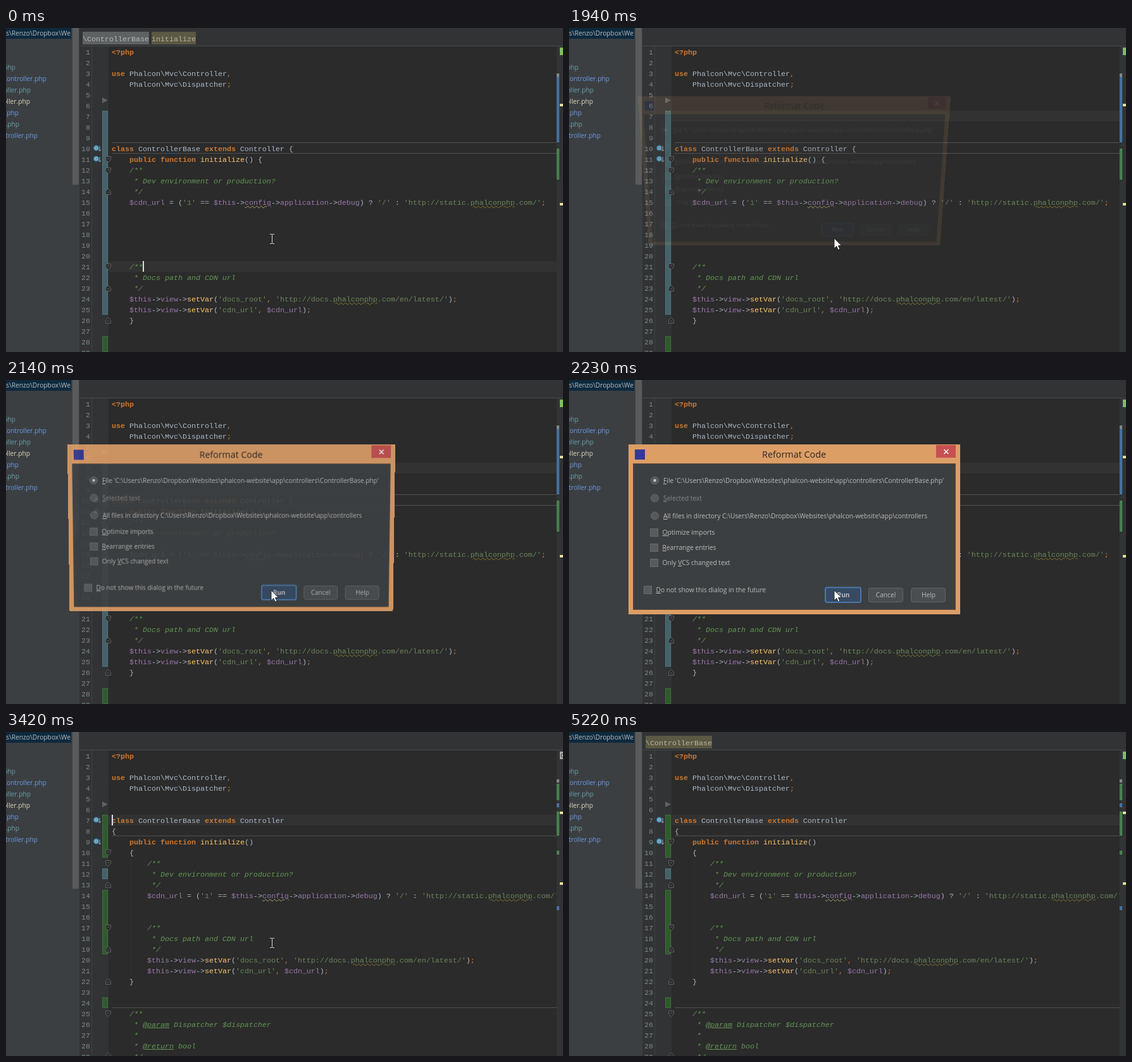
These frames come from a looping animation (880x513 px, 5640 ms). An HTML page:

```html
<!DOCTYPE html>
<html lang="en">
<head>
<meta charset="utf-8">
<title>Reformat Code</title>
<style>
  html, body { margin: 0; width: 100%; height: 100%; overflow: hidden; background: #2b2b2b; }
  #stage { position: relative; width: 880px; height: 513px; overflow: hidden; background: #2b2b2b; }
  #stage > *, .view > * { position: absolute; }
  .full, .view { left: 0; top: 0; width: 880px; height: 513px; }
  svg { display: block; }
  svg text { font: 10.24px "Open Sans", sans-serif; }
  pre, .crumbs span { margin: 0; font: 11.667px/17px "Liberation Mono", monospace; white-space: pre; }
  .code { left: 167px; top: 31px; width: 703px; height: 482px; overflow: hidden; color: #a9b7c6; }
  #nums { left: 113px; top: 31px; width: 20px; text-align: right; color: #7b898b; }
  .key { color: #cc7832; font-weight: bold; }
  .punct { color: #cc7832; }
  .str { color: #6a8759; }
  .var { color: #9876aa; }
  .fn { color: #ffc66d; }
  .doc { color: #629755; font-style: italic; }
  .typo, .warn { text-decoration: underline wavy #857a30 1px; text-underline-offset: 1px; }
  .warn { text-decoration-color: #aaa370; }
  .crumbs { left: 121px; top: 6px; display: flex; gap: 4px; }
  .crumbs span { height: 20px; line-height: 24px; color: #b4b8b8; background: #5f6263; }
  .crumbs .here { color: #b9b69c; background: #5b5843; }
  #row { left: 162px; top: 29px; width: 708px; height: 17px; background: #323232; }
  #caret { left: 167px; top: 29px; width: 2px; height: 17px; background: #dcdcdc; }
  #dialog { left: 94px; top: 102px; width: 524px; height: 269px; }
  #dialog .btn text { text-anchor: middle; }
</style>
</head>
<body>
<div id="stage">
  <svg class="full" viewBox="0 0 880 513">
    <rect width="116" height="513" fill="#3c3f41"/>
    <rect width="103" height="17" fill="#0d293e"/>
    <text y="12" fill="#b8bec2">s\Renzo\Dropbox\We</text>
    <g id="tree" text-anchor="end"></g>
    <rect x="105" width="10" height="248" fill="#595b5c"/>
    <rect x="116" width="764" height="28" fill="#313335"/>
    <rect x="116" y="28" width="46" height="485" fill="#313335"/>
    <rect x="870" y="28" width="10" height="485" fill="#313335"/>
    <path d="M116 28.500H880" stroke="#46494b"/>
    <path d="M135.500 29V513" stroke="#4a4d4e" stroke-dasharray="1 1"/>
  </svg>
  <div id="row"></div>
  <pre id="nums"></pre>

  <div id="before" class="view">
    <svg class="full" viewBox="0 0 880 513"></svg>
    <pre class="code">&lt;?php

use Phalcon\Mvc\Controller,
    Phalcon\Mvc\Dispatcher;





class ControllerBase extends Controller {
    public function initialize() {
    /**
     * Dev environment or production?
     */
    $cdn_url = ('1' == $this->config->application->debug) ? '/' : 'http://static.phalconphp.com/';





    /**
     * Docs path and CDN url
     */
    $this->view->setVar('docs_root', 'http://docs.phalconphp.com/en/latest/');
    $this->view->setVar('cdn_url', $cdn_url);
    }</pre>
  </div>

  <div id="after" class="view">
    <svg class="full" viewBox="0 0 880 513"></svg>
    <pre class="code">&lt;?php

use Phalcon\Mvc\Controller,
    Phalcon\Mvc\Dispatcher;


class ControllerBase extends Controller
{
    public function initialize()
    {
        /**
         * Dev environment or production?
         */
        $cdn_url = ('1' == $this->config->application->debug) ? '/' : 'http://static.phalconphp.com/';


        /**
         * Docs path and CDN url
         */
        $this->view->setVar('docs_root', 'http://docs.phalconphp.com/en/latest/');
        $this->view->setVar('cdn_url', $cdn_url);
    }


    /**
     * @param Dispatcher $dispatcher
     *
     * @return bool
     */</pre>
  </div>

  <svg class="full" viewBox="0 0 880 513">
    <path d="M152 110L161 114.500L152 119Z" fill="#606365"/>
    <rect id="status" x="875" y="31" width="5" height="12" fill="#7fbf5f"/>
    <g id="busy"><rect x="875" y="31" width="5" height="12" fill="#a8a8a8"/><path d="M880 34a3 3 0 0 0 0 6" fill="none" stroke="#444"/></g>
    <g id="fold1"></g>
  </svg>
  <div id="crumbs1" class="crumbs"><span>\ControllerBase</span><span class="here">initialize</span></div>
  <div id="crumbs2" class="crumbs"><span class="here">\ControllerBase</span></div>
  <div id="caret"></div>

  <svg id="dialog" viewBox="94 102 524 269">
    <rect id="frame" x="94" y="102" width="524" height="269" fill="#dd9e66"/>
    <rect x="101.500" y="132.500" width="509" height="231" fill="#3c3f41" stroke="#000" stroke-opacity=".3"/>
    <rect x="104" y="110" width="16" height="16" fill="#34389a"/>
    <text x="355.500" y="123" text-anchor="middle" style="font-size:14.35px" fill="#2a2522">Reformat Code</text>
    <rect id="close" x="580" y="103" width="31" height="20" fill="#c75050"/>
    <path d="M592.500 110l7 7m0-7l-7 7" stroke="#fff" stroke-width="1.500"/>
    <g id="options" fill="#bbb"></g>
    <g class="btn" fill="#bbb">
      <rect x="405" y="328.500" width="56" height="23.500" rx="3" fill="#364a63" stroke="#4a78ad" stroke-width="2"/>
      <text x="433.500" y="344" style="font-weight:bold">Run</text>
      <rect x="473.500" y="329.500" width="54" height="22" rx="3" fill="#4a4e50" stroke="#626668"/>
      <text x="500.500" y="344">Cancel</text>
      <rect x="540.500" y="329.500" width="54" height="22" rx="3" fill="#4a4e50" stroke="#626668"/>
      <text x="568" y="344">Help</text>
    </g>
  </svg>

  <svg class="full" viewBox="0 0 880 513">
    <path id="beam" d="M417 326.500h3m1 0h3M420.500 327v14M417 341.500h3m1 0h3" fill="none" stroke="#d6d6d6"/>
    <path id="arrow" d="M419 333v16l3.800-3.400 2.500 5.600 2.600-1.100-2.500-5.500h5z" fill="#fff" stroke="#111" stroke-width=".8"/>
  </svg>
</div>

<script>
const LOOP = 5640;
const $ = s => document.querySelector(s);
const rect = (x, y, w, h, fill) => `<rect x="${x}" y="${y}" width="${w}" height="${h}" fill="${fill}"/>`;
const span = (cls, s) => `<span class="${cls}">${s}</span>`;

// Syntax colours
const TOKENS = /('[^']*')|(<\?php|\b(?:use|class|extends|public|function)\b)|(setVar|initialize)|(\$\w+|(?<=->)\w+)|([,;])/g;
const KINDS = ['str', 'key', 'fn', 'var', 'punct'];

function paint(line) {
  if (/^\s*(\/\*|\*)/.test(line)) return span('doc', line.replace(/@\w+/, '<u>$&</u>'));
  return line
    .replace(TOKENS, (m, ...g) => span(KINDS[g.findIndex((v, i) => v && i < 5)], m.replace('<', '&lt;')))
    .replace('phalconphp', span('typo', '$&'))
    .replace('config', span('warn', '$&'));
}
document.querySelectorAll('.code').forEach(el => {
  el.innerHTML = el.textContent.split('\n').map(paint).join('\n');
});
$('#nums').textContent = Array.from({ length: 29 }, (_, i) => i + 1).join('\n');

// Gutter and stripe marks
const GREEN = '#2f5a2b', TEAL = '#43626a', BLUE = '#3d6c9c', LEAF = '#3f7d48', PALE = '#e6dfa2', GREY = '#7d8082';
const fold = (y, up) => `<path transform="translate(161.500 ${y}) scale(1 ${up ? -1 : 1})" d="M-4-4.500h8v5l-4 4-4-4zM-2-1h4" fill="#2b2b2b" stroke="#5c5f61"/>`;
const override = y => `<circle cx="142.500" cy="${y}" r="3.500" fill="#b4cad6" stroke="#3c86ad" stroke-width="2"/>
  <circle cx="142.500" cy="${y}" r="1.200" fill="#2d6f99"/><path d="M148 ${y - 3}v8m-2-2.500l2 2.500 2-2.500" fill="none" stroke="#95a4ab"/>`;
const rule = y => `<path d="M167 ${y}.500H870" stroke="#505050"/>`;
const bar = (x, y, w, h, fill) => rect(x, y, w, h, fill) +
  `<rect x="${x + .5}" y="${y + .5}" width="${w - 1}" height="${h - 1}" fill="none" stroke="#fff" stroke-opacity=".1"/>`;
const change = (y, h, fill) => bar(152, y, 9, h, fill);
const stripe = (y, h, fill) => bar(870, y, 4, h, fill);
const tick = y => rect(875, y, 5, 4, PALE);

$('#before svg').innerHTML = [
  change(131, 323, TEAL), change(488, 25, GREEN), rule(181), rule(198),
  override(190), override(207),
  ...[208, 226, 378].map(y => fold(y)), ...[259, 412, 463].map(y => fold(y, true)),
  stripe(72, 5, GREY), stripe(77, 104, BLUE), stripe(191, 49, LEAF), tick(120), tick(277)
].join('');

$('#after svg').innerHTML = [
  change(131, 68, GREEN), change(216, 17, TEAL), change(250, 102, GREEN), change(420, 17, GREEN),
  rule(164), rule(436), override(139), override(173),
  '<path d="M197.500 200V387" stroke="#303030"/>',
  ...[208, 310, 446].map(y => fold(y)), ...[242, 344, 395, 512].map(y => fold(y, true)),
  stripe(75, 5, GREY), stripe(82, 26, LEAF), stripe(113, 6, BLUE), stripe(126, 38, LEAF),
  stripe(188, 6, LEAF), stripe(276, 6, BLUE), tick(126), tick(238)
].join('');
$('#fold1').innerHTML = fold(191);

// Project tree: right edge and colour of each row
const AQUA = '#67a1ab', SKY = '#6b9ae6';
$('#tree').innerHTML = [[15, AQUA], [64, SKY], [39, AQUA], [38, '#d8d5b8'], [20, SKY], [21, AQUA], [50, SKY]]
  .map(([x, c], i) => `<text x="${x}" y="${66 + 18 * i}" fill="${c}">Controller.php</text>`).join('');

// Dialog options; _ marks the mnemonic
const mark = s => s.replace(/_(.)/, '<tspan text-decoration="underline">$1</tspan>');
const label = (x, y, s, c = '#bbb') => `<text x="${x}" y="${y + 4}" fill="${c}">${mark(s)}</text>`;
const DIR = 'C:\\Users\\Renzo\\Dropbox\\Websites\\phalcon-website\\app\\controllers';
const radio = (y, s, c) => `<circle cx="135.500" cy="${y}" r="6" fill="#55595b" stroke="#686b6d"/>` + label(149, y, s, c);
const check = (x, y, s) => rect(x, y - 6, 13, 13, '#686a6b') + rect(x + 1, y - 5, 11, 11, '#585b5d') + label(x + 19.5, y, s);
$('#options').innerHTML = [
  radio(159, `_File '${DIR}\\ControllerBase.php'`), '<circle cx="135.500" cy="159" r="2.200" fill="#c8c8c8"/>',
  radio(187, '_Selected text', '#858789'), radio(215, `_All files in directory ${DIR}`),
  check(128, 241, '_Optimize imports'), check(128, 265, '_Rearrange entries'),
  check(128, 289, 'Only _VCS changed text'), check(118, 332, '_Do not show this dialog in the future')
].join('');

// Timelines
const play = (id, frames) => $(id).animate(frames, { duration: LOOP, iterations: Infinity });
const hold = (id, steps, style) => {
  const frames = steps.map(([t, ...v]) => ({ offset: t / LOOP, easing: 'step-end', ...style(...v) }));
  play(id, [...frames, { ...frames[frames.length - 1], offset: 1 }]);
};
const show = (id, ...steps) => hold(id, steps, opacity => ({ opacity }));

const moves = [[0, 21, 7], [220, 19, 0], [280, 17, 0], [340, 15, 7], [400, 13, 7], [450, 12, 7],
  [510, 10, 7], [570, 8, 0], [630, 7, 0], [940, 6, 0], [1150, 7, 0]];
hold('#row', moves, line => ({ transform: `translateY(${(line - 1) * 17}px)` }));
hold('#caret', moves, (line, col) => ({ transform: `translate(${col * 7}px, ${(line - 1) * 17}px)` }));
show('#caret', [0, 1], [1940, 0], [3380, 1], [4220, 0], [4720, 1], [5220, 0]);

show('#before', [0, 1], [3380, 0]);
show('#after', [0, 0], [3380, 1]);
show('#crumbs1', [0, 1], [820, 0]);
show('#crumbs2', [0, 0], [3700, 1]);
show('#busy', [0, 0], [3380, 1], [3620, 0]);
hold('#fold1', [[0, 0, 0], [3380, 1, 0], [3510, 1, -17]], (opacity, y) => ({ opacity, transform: `translateY(${y}px)` }));

// Dialog: opacity and amount of tilt
hold('#dialog', [[0, 0, 2], [1940, .12, 2], [1990, .35, 1.5], [2050, .65, 1], [2080, .78, .7], [2140, .9, .4],
  [2190, .97, .15], [2230, 1, 0], [3340, .55, .6], [3380, .2, 1.3], [3420, 0, 2]],
  (opacity, k) => ({
    opacity,
    transform: k ? `perspective(1050px) translateY(${-3 * k}px) scale(${1 - .045 * k}) rotateX(${-8 * k}deg)` : 'none'
  }));
const fill = c => ({ fill: c });
hold('#frame', [[0, '#dd9e66'], [3280, '#ebebeb']], fill);
hold('#close', [[0, '#c75050'], [3280, '#bcbcbc']], fill);

// Pointer
show('#beam', [0, 1], [1940, 0], [3280, 1], [4940, 0]);
show('#arrow', [0, 0], [1940, 1], [3280, 0]);
const at = (t, x, y, easing = 'linear') => ({ offset: t / LOOP, transform: `translate(${x}px, ${y}px)`, easing });
play('#beam', [at(0, 0, 0), at(4340, 0, 0, 'ease-in-out'), at(4800, 344, 150), at(4890, 340, 170), at(LOOP, 340, 170)]);
</script>
</body>
</html>
```
